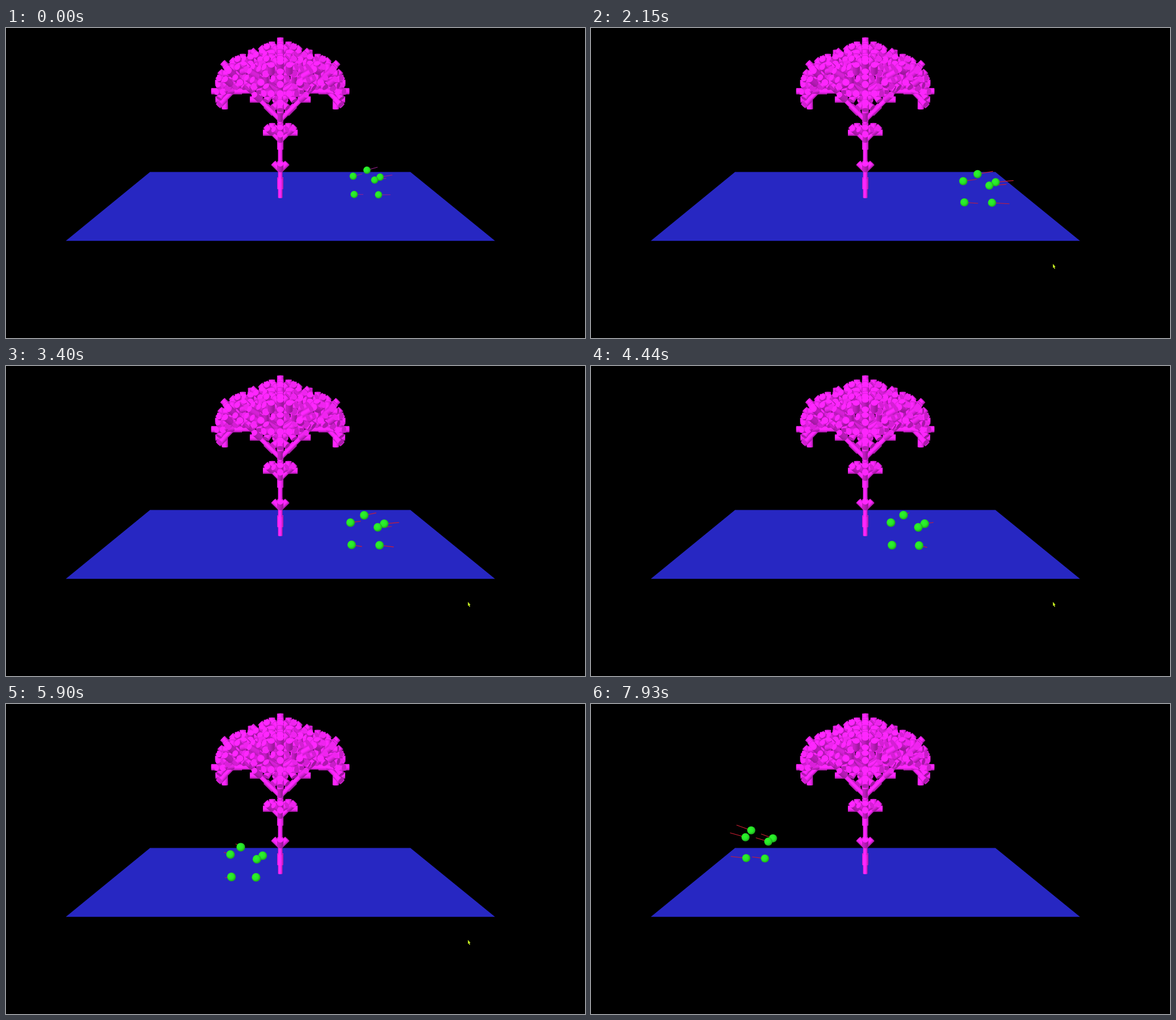
Write an HTML page with a canvas that moves like this. It is 1023 px wide and 548 px high and loops after 8000 ms.

```html
<!DOCTYPE html>
<html>
<head>
<meta charset="utf-8">
<title>Tree and orbiting balls</title>
<style>
html, body { margin: 0; width: 1023px; height: 548px; overflow: hidden; background: #000; }
canvas { display: block; }
</style>
</head>
<body>
<canvas id="stage" width="1023" height="548"></canvas>
<script>
const W = 1023, H = 548, LOOP = 8000, STEP = 69.5, LAST = 114;
const g = document.getElementById('stage').getContext('2d');

// ---- camera ----
const FOCAL = 1146, PITCH = 10 * Math.PI / 180;
const CP = Math.cos(PITCH), SP = Math.sin(PITCH);
const add = (a, b, k = 1) => a.map((v, i) => v + b[i] * k);
const unit = a => { const l = Math.hypot(...a) || 1; return a.map(v => v / l); };
const dot = (a, b) => a[0] * b[0] + a[1] * b[1] + a[2] * b[2];
const toView = p => [p[0], p[1] * CP - p[2] * SP, p[2] * CP + p[1] * SP];
function project(p) {
  const s = FOCAL / (FOCAL - p[2]);
  return { x: 484.6 + p[0] * s, y: 274 + (26 - p[1]) * s, s };
}

function polygon(c, color, ...pts) {
  c.fillStyle = color;
  c.beginPath();
  for (const [x, y] of pts) c.lineTo(x, y);
  c.fill();
}

// ---- tree ----
const THIN = 4.2, THICK = 5.5;
const rods = [];
function rod(pos, frame, from, to, r) {
  rods.push({ a: toView(add(pos, frame[0], from)), b: toView(add(pos, frame[0], to)), r });
}
// four frames tilted by 45 degrees around the growing direction
function tilted([d, p, q]) {
  const out = [];
  for (const s of [1, -1]) {
    out.push([unit(add(d, p, s)), unit(add(p, d, -s)), q]);
    out.push([unit(add(d, q, s)), p, unit(add(q, d, -s))]);
  }
  return out;
}
function smallCrown(pos, frame) {
  for (const f of tilted(frame)) rod(pos, f, 0, 17, THICK);
}
function midCrown(pos, frame) {
  for (const f of tilted(frame)) {
    rod(pos, f, 0, 20, THIN);
    const end = add(pos, f[0], 20);
    for (const c of [f, ...tilted(f)]) rod(end, c, 0, 16, THICK);
  }
}
function twig(pos, frame) {
  rod(pos, frame, 0, 69, THIN);
  rod(pos, frame, 16, 34, THICK);
  rod(pos, frame, 52, 69, THICK);
  midCrown(add(pos, frame[0], 32), frame);
}
function limb(pos, frame) {
  rod(pos, frame, 0, 70, THIN);
  rod(pos, frame, 16, 35, THICK);
  smallCrown(add(pos, frame[0], 50), frame);
  const end = add(pos, frame[0], 70);
  for (const f of [frame, ...tilted(frame)]) twig(end, f);
}
function growTree() {
  const up = [[0, 1, 0], [1, 0, 0], [0, 0, 1]], root = [0, 0, 0];
  for (let y = 0; y < 137; y += 17.125) rod(root, up, y, y + 17.2, 4);
  rod(root, up, 16, 36, THICK);
  rod(root, up, 86, 104, THICK);
  rod(root, up, 134, 150, THICK);
  smallCrown([0, 50, 0], up);
  midCrown([0, 101, 0], up);
  for (const f of [up, ...tilted(up)]) limb([0, 137, 0], f);
}

const LIGHT = unit([-0.3, 0.4, 0.87]);
function tint(n) {
  const k = Math.min(1, 0.62 + 0.47 * Math.max(0, dot(n, LIGHT)));
  return `rgb(${Math.round(255 * k)},${Math.round(38 * k)},${Math.round(255 * k)})`;
}
function drawRod(c, { a, b, r }) {
  const axis = unit(add(b, a, -1));
  const A = project(a), B = project(b);
  const flat = Math.hypot(axis[0], axis[1]);
  const dir = flat > 0.01 ? [axis[0] / flat, axis[1] / flat] : [1, 0];
  const side = [-dir[1], dir[0], 0];
  const face = unit(add([0, 0, 1], axis, -axis[2]));
  const ang = Math.atan2(-dir[1], dir[0]);
  const ra = r * A.s, rb = r * B.s;
  const edge = (P, k) => [P.x + side[0] * k, P.y - side[1] * k];
  const gr = c.createLinearGradient(...edge(A, -ra), ...edge(A, ra));
  for (let i = 0; i <= 6; i++) {
    const t = i / 3 - 1;
    gr.addColorStop(i / 6, tint(add(side.map(v => v * t), face, Math.sqrt(Math.max(0, 1 - t * t)))));
  }
  const cap = (P, rad, fill) => {
    c.fillStyle = fill;
    c.beginPath();
    c.ellipse(P.x, P.y, Math.abs(axis[2]) * rad, rad, ang, 0, 7);
    c.fill();
  };
  const front = axis[2] > 0;
  cap(front ? A : B, front ? ra : rb, gr);
  polygon(c, gr, edge(A, -ra), edge(B, -rb), edge(B, rb), edge(A, ra));
  cap(front ? B : A, front ? rb : ra, tint(front ? axis : axis.map(v => -v)));
}

// ---- static backdrop ----
const back = document.createElement('canvas');
back.width = W;
back.height = H;
function drawBack() {
  const c = back.getContext('2d');
  c.fillStyle = '#000';
  c.fillRect(0, 0, W, H);
  polygon(c, '#2727c2', [254.5, 254.6], [714.5, 254.6], [864, 376.2], [105.7, 376.2]);
  growTree();
  rods.sort((m, n) => m.a[2] + m.b[2] - n.a[2] - n.b[2]);
  for (const r of rods) drawRod(c, r);
}

// ---- balls: one swinging group; each has x, y and its drift as the group turns ----
const BALLS = [
  [-2, -26.2, -11], [-29.7, -13, -3], [24.5, -11, 10],
  [13.5, -4.6, 9], [-27.7, 27, -3], [21.3, 27.7, -2]
];
const HUB = { x: 480, y: 295 };

function drawBalls(k) {
  const u = k - 57, q = u / 57;
  const cx = HUB.x - 210 * Math.sin(0.0314 * (k - 76.5)) + q ** 6 * (13.7 - 4.3 * q);
  const cy = 290.5 - u * u * (0.0139 + 6.72e-5 * u - 1.39e-6 * u * u);
  const sx = Math.cos(0.0119 * (k - 42)), sy = Math.cos(0.009 * (k - 70));
  const r = 7.7 * sy ** 0.8, pull = 0.0183 * r;
  const pts = BALLS.map(([x, y, turn]) => ({ x: cx + x * sx + turn * k / LAST, y: cy + y * sy }));

  const m = Math.min(1, k / 31);
  g.lineWidth = 1.1;
  g.strokeStyle = `rgb(${155 + 50 * m},${32 - 2 * m},${145 - 95 * m})`;
  for (const p of pts) {
    g.beginPath();
    g.moveTo(p.x, p.y);
    g.lineTo(p.x + (p.x - HUB.x) * pull, p.y + (p.y - HUB.y) * pull);
    g.stroke();
  }
  for (const p of pts) {
    const gr = g.createRadialGradient(p.x - r * 0.3, p.y - r * 0.3, 0, p.x - r * 0.1, p.y - r * 0.1, r * 1.15);
    gr.addColorStop(0, '#2cf72c');
    gr.addColorStop(0.6, '#27e627');
    gr.addColorStop(1, '#1c9e1c');
    g.fillStyle = gr;
    g.beginPath();
    g.arc(p.x, p.y, r, 0, 7);
    g.fill();
  }
}

// ---- pointer: glides in, rests, leaves to the right ----
function drawPointer(k) {
  if (k < 7 || k > 112) return;
  const come = Math.max(0, (12 - k) / 5) ** 2, go = Math.max(0, (k - 106) / 6) ** 2;
  g.save();
  g.translate(816 + 40 * come + 122 * go, 417 + 61 * come + 23 * go);
  polygon(g, '#c8f022', [0, 0], [4.8, 5.2], [3, 5.6], [4, 8.6], [2.8, 9], [1.8, 6.2], [0.3, 7]);
  g.restore();
}

function render(t) {
  const k = Math.min(LAST, Math.floor(t / STEP + 0.2));
  g.drawImage(back, 0, 0);
  drawBalls(k);
  drawPointer(k);
}

drawBack();
const start = performance.now();
function tick() {
  render((performance.now() - start) % LOOP);
  requestAnimationFrame(tick);
}
tick();
</script>
</body>
</html>
```
